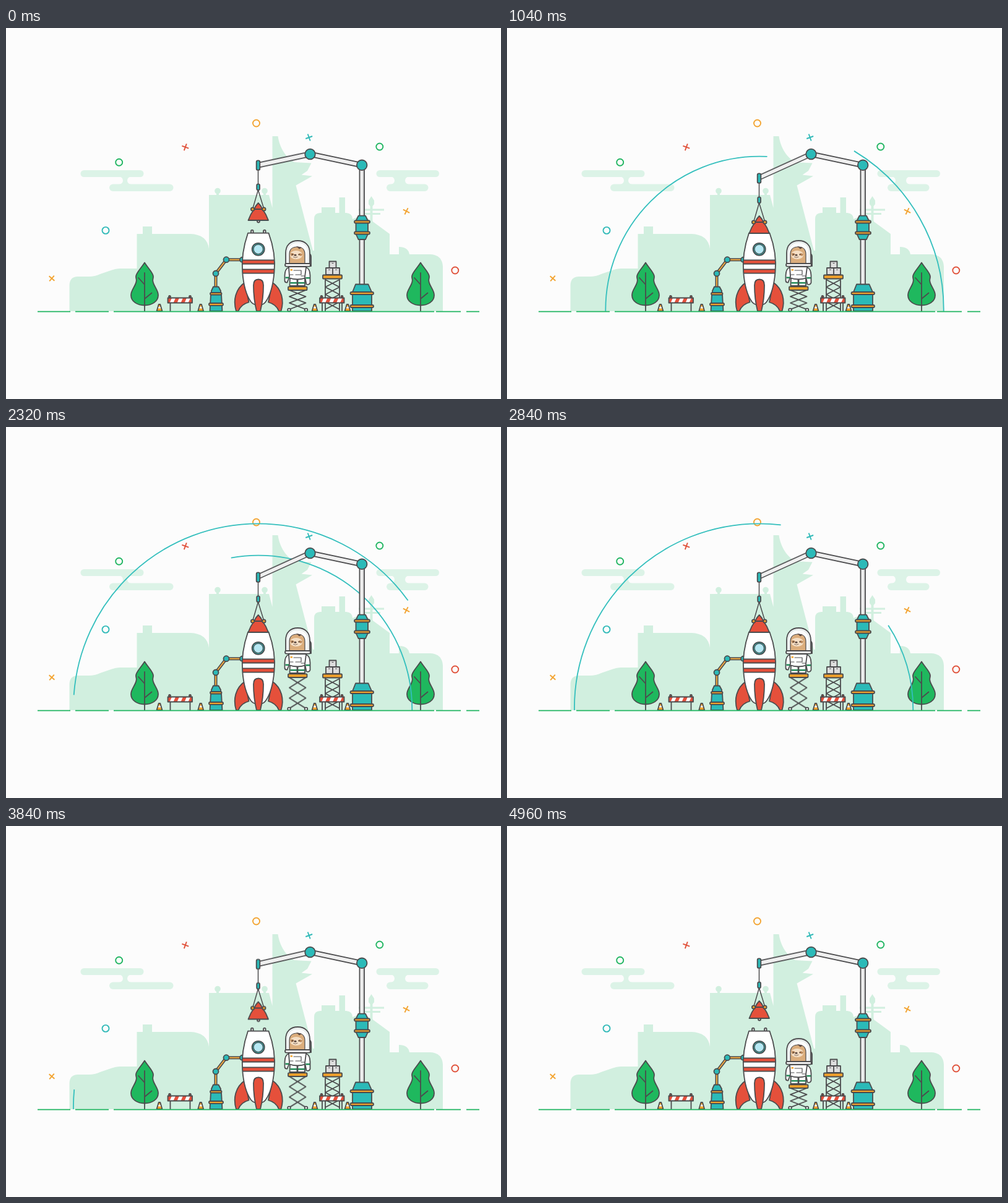
These frames come from a looping animation (800x600 px, 5000 ms). An HTML page:

```html
<!DOCTYPE html>
<html lang="en">
<head>
<meta charset="utf-8">
<title>Rocket assembly</title>
<style>
  html, body { margin: 0; width: 100%; height: 100%; overflow: hidden; background: #fcfcfc; }
  svg { display: block; width: 100vw; height: 100vh; }
  .ink { stroke: #4b4b4d; stroke-width: 1.8; stroke-linejoin: round; stroke-linecap: round; }
  .none { fill: none; }
  .white { fill: #fff; }
  .pale { fill: #efefef; }
  .grey { fill: #dedede; }
  .red { fill: #e5503b; }
  .orange { fill: #f5a32b; }
  .teal { fill: #2bbab8; }
  .green { fill: #1fb85e; }
  .city { fill: #d1efdf; }
  .cloud { fill: #dcf3e7; }
  .deco { fill: none; stroke-width: 1.9; }
  .sR { stroke: #e0513a; }
  .sO { stroke: #f3a431; }
  .sT { stroke: #31bab8; }
  .sG { stroke: #20b561; }

  .hook, .arm, .rider, .scissor {
    animation: 5s cubic-bezier(.333, 0, .667, 1) infinite;
  }
  .hook { animation-name: hook; }
  .arm { animation-name: arm; }
  .rider { animation-name: rider; }
  .scissor { animation-name: scissor; transform-origin: 471px 455px; }
  .scissor path { vector-effect: non-scaling-stroke; }
  .arc { fill: none; stroke: #33bfbd; stroke-width: 1.8; animation: 5s linear infinite; }
  .inner { animation-name: inner; }
  .outer { animation-name: outer; }

  @keyframes hook {
    0%, 80%, 100% { transform: translateY(0); }
    20%, 60% { transform: translateY(21px); }
  }
  @keyframes arm {
    0%, 80%, 100% { transform: skewY(-12deg); }
    20%, 60% { transform: skewY(-24.4deg); }
  }
  @keyframes rider {
    0%, 20%, 100% { transform: translateY(0); }
    40%, 80% { transform: translateY(-19px); }
  }
  @keyframes scissor {
    0%, 20%, 100% { transform: scaleY(1); }
    40%, 80% { transform: scaleY(1.613); }
  }
  /* dash lists: empty dash, tail, visible length, rest */
  @keyframes inner {
    0%, .32% { stroke-dasharray: 0 0 0 400; }
    34% { stroke-dasharray: 0 0 152.7 400; }
    40.02% { stroke-dasharray: 0 38.7 141.3 400; }
    62%, 100% { stroke-dasharray: 0 180 0 400; }
  }
  @keyframes outer {
    0%, 7.76% { stroke-dasharray: 0 0 0 400; }
    38.46% { stroke-dasharray: 0 0 139.2 400; }
    47.46% { stroke-dasharray: 0 40.8 139.2 400; }
    78.16%, 100% { stroke-dasharray: 0 180 0 400; }
  }
</style>
</head>
<body>
<svg viewBox="0 0 800 600">
  <defs>
    <g id="tree" class="ink">
      <path class="green" d="M0 379.500C6 389 14 396 14 402C14 406 12.500 407 13.500 410C15 418 22 424 22 432C22 443 11 448.500 0 448.500S-22 443 -22 432C-22 424 -15 418 -13.500 410C-12.500 407 -14 406 -14 402C-14 396 -6 389 0 379.500Z"/>
      <path class="none" d="M0 396V458M-10 404L0 415M11.500 428.500L0 438"/>
    </g>
    <g id="cone">
      <path class="orange" d="M-4.500 458L-1.300 447H1.300L4.500 458Z"/>
      <path class="white" d="M-2.800 453.500L-1.900 450.500H1.900L2.800 453.500Z"/>
      <path class="ink none" stroke-width="1.400" d="M-4.500 458L-1.200 446.800H1.200L4.500 458Z"/>
    </g>
    <g id="barrier">
      <path class="ink none" d="M4.500 445V458M36.500 445V458"/>
      <g class="ink red"><circle cx="3.500" cy="434.500" r="1.500"/><circle cx="36.500" cy="434.500" r="1.500"/></g>
      <path class="white" d="M.5 436.500H40V444.500H.5Z"/>
      <path class="red" d="M.5 436.500H7L3.500 444.500H.5ZM13 436.500H19L15.500 444.500H9.500ZM25 436.500H31L27.500 444.500H21.500ZM37 436.500H40V444.500H33.500Z"/>
      <path class="ink none" d="M.5 436.500H40V444.500H.5Z"/>
    </g>
    <path id="fin" class="ink red" d="M386 411.500C371 422 366.500 440 372 458H375.500C378 451 383 446 392.500 443.500Z"/>
    <path id="plus" d="M-5.800 0H5.800M0 -5.800V5.800"/>
  </defs>

  <g class="cloud">
    <rect x="120.500" y="230" width="102" height="11" rx="5.500"/>
    <rect x="167" y="252.500" width="103.500" height="11.500" rx="5.700"/>
    <path d="M183 240.500a6 6.200 0 0 1 0 12.400H202a6 6.200 0 0 1 0 -12.400Z"/>
    <rect x="598.500" y="230" width="101.500" height="11" rx="5.500"/>
    <rect x="615" y="252.500" width="67.500" height="11.500" rx="5.700"/>
    <path d="M622 240.500a6 6.200 0 0 1 0 12.400H651a6 6.200 0 0 1 0 -12.400Z"/>
  </g>

  <g class="city">
    <path d="M102.500 458V416Q103 402 116 402H134Q144 402 152 398L171 391.500Q177 389 184 389H211.500V333H221V321H236V333H298Q325 334 328 357V270H425L430.500 291V175H439.500C442 194 453 210 466 217L493.500 218.500L487 231L477.500 237.500L495 239.500L468.500 254.500L496 360H498V309Q498 299 508 299H510V290H532V299H538.500V274H548V299H550Q560 300 560 309L575 303L590 311L620 333V366H635V354Q650 354 652 366H686Q705 367 706 386V458Z"/>
    <circle cx="342" cy="263.500" r="4.800"/><circle cx="418" cy="263.500" r="4.800"/>
    <path d="M340 265H344V271H340ZM416 265H420V271H416Z"/>
    <path d="M590.500 272L595 279V285L592.500 288V292.500H611V295.500H592.500V299H605V302H592.500V314H588.500V302H580V299H588.500V295.500H570V292.500H588.500V288L586 285V279Z"/>
  </g>

  <g class="deco">
    <circle class="sO" cx="404.500" cy="154" r="5.500"/>
    <circle class="sG" cx="182.700" cy="217.200" r="5.500"/>
    <circle class="sG" cx="603.800" cy="192" r="5.500"/>
    <circle class="sT" cx="161" cy="327.400" r="5.500"/>
    <circle class="sR" cx="725.800" cy="392" r="5.500"/>
    <use href="#plus" class="sR" transform="translate(289.800 192.700) rotate(20)"/>
    <use href="#plus" class="sT" transform="translate(489.700 177) rotate(-20)"/>
    <use href="#plus" class="sO" transform="translate(647 296.300) rotate(27)"/>
    <use href="#plus" class="sO" transform="translate(74 405) rotate(41)"/>
  </g>

  <use href="#tree" x="224"/>
  <use href="#tree" x="670"/>

  <path class="arc inner" pathLength="180" d="M159.300 458V456A248.500 248.500 0 0 1 656.300 456V458"/>
  <path class="arc outer" pathLength="180" d="M705.700 458V454.700A298.400 298.400 0 0 0 108.900 454.700V458"/>

  <use href="#cone" x="248"/>
  <use href="#cone" x="314.700"/>
  <use href="#cone" x="499"/>
  <use href="#cone" x="552"/>
  <use href="#barrier" x="261"/>

  <!-- service arm -->
  <g class="ink">
    <path class="none" stroke-linecap="butt" style="stroke-width:5" d="M339 419V397L356 374.700H382"/>
    <path class="none" stroke-linecap="butt" style="stroke:#f0a840;stroke-width:2" d="M339 419V397L356 374.700H382"/>
    <g class="teal">
      <circle cx="339" cy="397" r="4.500"/><circle cx="356" cy="374.700" r="4.500"/><circle cx="382" cy="374.700" r="4"/>
      <path d="M335 418.500H343.500L347 425V430H348L349.500 458H329.500L331 430H332V425Z"/>
    </g>
    <g class="orange">
      <rect x="330" y="428" width="18.500" height="3.500" rx="1.700"/>
      <rect x="328" y="445" width="23" height="3.800" rx="1.800"/>
    </g>
  </g>

  <!-- cargo tower -->
  <g class="ink">
    <path class="none" d="M516 405V458M539 405V458M516 407L539 419L516 431L539 443L516 455M539 407L516 419L539 431L516 443L539 455"/>
    <g class="grey">
      <path d="M522.500 377.500H533.500V388H522.500ZM517 388H528V399H517ZM528 388H539V399H528Z"/>
      <path stroke-width="1" d="M527 380.500H529M521.500 391H523.500M532.500 391H534.500"/>
    </g>
    <rect class="orange" x="512" y="399.500" width="31" height="6" rx="1"/>
  </g>
  <use href="#barrier" x="506.500"/>

  <!-- rocket -->
  <g class="ink grey">
    <path d="M396 332V328.500a1.800 1.800 0 0 1 3.600 0V332M416 332V328.500a1.800 1.800 0 0 1 3.600 0V332"/>
    <circle class="hook" cx="408" cy="312.500" r="2"/>
  </g>
  <use href="#fin"/>
  <use href="#fin" transform="matrix(-1 0 0 1 816.500 0)"/>
  <clipPath id="hull">
    <path id="hullShape" d="M391 331.700H424.500C432 352 435.500 374 433.500 395C431.500 418 426 434 419.500 443Q416 448 408 448T396 443C389.500 434 384 418 382.200 395C380.500 374 384 352 391 331.700Z"/>
  </clipPath>
  <use href="#hullShape" class="white"/>
  <path class="ink red" clip-path="url(#hull)" d="M378 375.300H438V381.500H378ZM378 390.300H438V396.700H378Z"/>
  <use href="#hullShape" class="ink none"/>
  <path class="ink red" d="M400 416C400 410 403 406.500 408 406.500S416 410 416 416C416 432 414 446 411 458H405C402 446 400 432 400 416Z"/>
  <circle class="ink teal" cx="407.700" cy="357.800" r="10"/>
  <circle class="ink" style="fill:#b5e8f3;stroke-width:1.200" cx="407.700" cy="357.800" r="7.700"/>

  <!-- crane -->
  <g class="ink">
    <path class="pale" d="M571.500 222H579V416H571.500Z"/>
    <path class="grey" stroke="none" d="M576 230H578V414H576Z"/>
    <g class="teal">
      <path d="M569.500 303.700H581L585 312V333L581 342H569.500L565.500 333V312Z"/>
      <path d="M565 414.500H585.500L591 427V458H560V427Z"/>
    </g>
    <g class="orange">
      <rect x="563" y="311.500" width="25" height="4" rx="2"/>
      <rect x="563" y="329.500" width="25" height="4" rx="2"/>
      <rect x="556.500" y="427" width="37.500" height="4" rx="2"/>
      <rect x="556.500" y="448" width="37.500" height="4" rx="2"/>
    </g>
    <rect class="pale" x="0" y="-3.700" width="86" height="7.400" transform="translate(491.500 204) rotate(12.100)"/>
    <g transform="translate(491.500 204)"><rect class="pale arm" x="-84" y="-3.900" width="84" height="7.800"/></g>
    <g class="teal"><circle cx="491.500" cy="204" r="8.300"/><circle cx="575.200" cy="221.800" r="8.300"/></g>

    <g class="hook">
      <path class="none" style="stroke-width:1.500" d="M407.500 229V253M407.500 262L398.500 293M407.500 262L417 293"/>
      <rect class="teal" x="404.700" y="214.300" width="5.600" height="15.400" rx="2.300"/>
      <rect class="teal" x="405.200" y="252.300" width="4.800" height="9.800" rx="2.200"/>
      <path class="red" d="M407.700 283Q412.500 287.500 414.500 293Q420.500 301 424 311H391.500Q395 301 401 293Q403 287.500 407.700 283Z"/>
      <path class="none" d="M399 293H417"/>
      <g class="orange"><circle cx="398.600" cy="293" r="2.700"/><circle cx="416.900" cy="293" r="2.700"/></g>
    </g>
  </g>

  <!-- lift and astronaut -->
  <g class="scissor">
    <path class="ink none" d="M458 424L484.500 434.300L458 444.700L484.500 455M484.500 424L458 434.300L484.500 444.700L458 455"/>
  </g>
  <g class="ink white"><circle cx="457.500" cy="456" r="2.300"/><circle cx="485" cy="456" r="2.300"/></g>
  <g class="rider ink">
    <path class="grey" d="M487 365H490Q493 366 493 370V385H487Z"/>
    <path fill="#fcfcfc" d="M452 383V364C452 351 460 344 471.500 344S491 351 491 364V383Z"/>
    <path class="none" style="stroke:#dfe7e5;stroke-width:1.400" d="M454.500 381V364C454.500 353 461 346.700 471.500 346.700S488.500 353 488.500 364V381"/>
    <path style="fill:#dbad7c;stroke-width:1.200" d="M458 381V366C458 358 463 354 470.500 354S483 358 483 366V381Z"/>
    <g stroke="none">
      <ellipse cx="469" cy="367" rx="10" ry="7" fill="#f5dfc6"/>
      <path fill="#b98658" d="M459.500 365Q464 362.500 466 366.500L461 369ZM479 366Q474 362.500 472 366.500L477 369Z"/>
      <ellipse cx="467.500" cy="367.300" rx="2" ry="1.500" fill="#5a4740"/>
      <circle cx="463" cy="366.500" r="1" fill="#443935"/><circle cx="473.500" cy="366.500" r="1" fill="#443935"/>
      <path fill="#5a4740" d="M469 353L478 355L474 357.500Z"/>
    </g>
    <path class="none" style="stroke:#5a4740;stroke-width:.8" d="M464.500 370.300Q467.500 372.500 471 370.300"/>
    <g class="white">
      <path d="M459 403H470.500V417H458.500ZM471.500 403H483V417H471.500Z"/>
      <path d="M457 386H485V404Q471 409 457 404Z"/>
      <path d="M457 387Q451 389 450.500 400V409Q451 412 454.500 411.500L458 402Z"/>
      <path d="M485 387Q491 389 491.500 400V412Q490 416 485.500 414.500L483 402Z"/>
      <rect x="451" y="381" width="41" height="4.600" rx="2.300"/>
    </g>
    <path class="none" style="stroke-width:1.200" d="M465 392H477V399H468M459 399H464M477 401H482"/>
    <path class="orange" stroke="none" d="M459.500 390H463V392.500H459.500Z"/>
    <path stroke="none" fill="#228a57" d="M459.500 411H470V413.500H459.500ZM472 411H482.500V413.500H472ZM484.500 403H491V405.500H484.500ZM451.500 402.500H457V405H451.500Z"/>
    <rect class="orange" x="456" y="418.300" width="30.500" height="5.700" rx="1"/>
  </g>

  <path class="sG" stroke-width="1.700" d="M51 458.700H104M112 458.700H166M174 458.700H692M695 458.700H735M744 458.700H765"/>
</svg>
</body>
</html>
```
